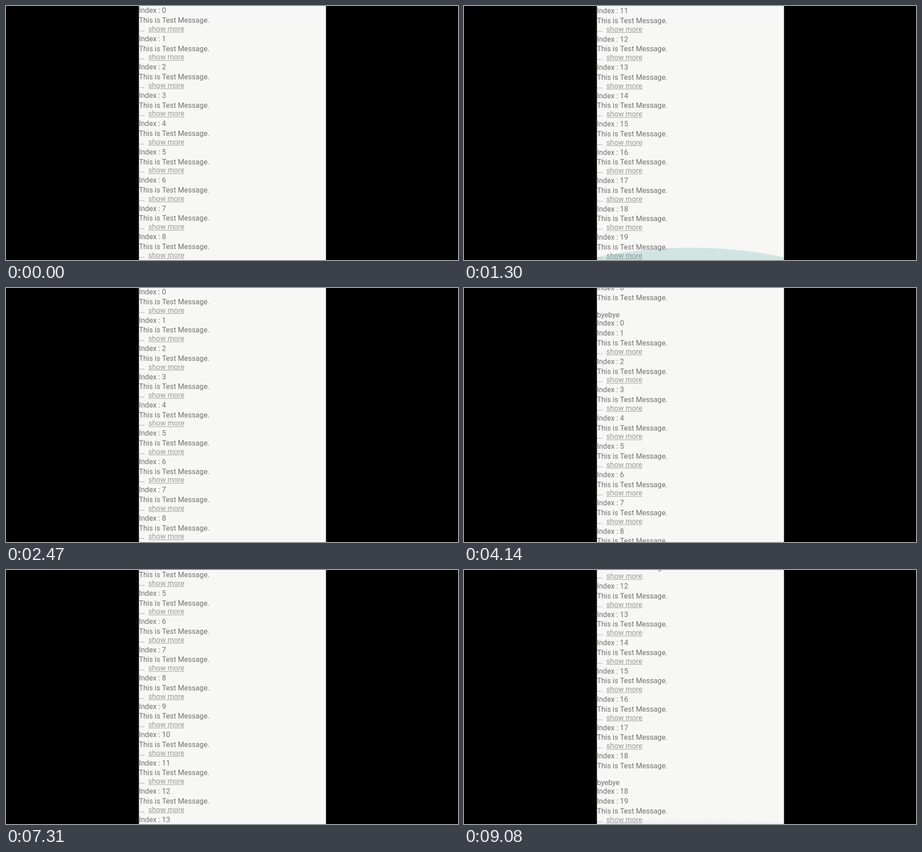
An HTML page with a canvas that plays this animation: 998 by 561 pixels, repeating every 9120 ms.

```html
<!DOCTYPE html>
<html lang="en">
<head>
<meta charset="utf-8">
<title>Expandable list</title>
<style>
html, body { margin: 0; width: 100%; height: 100%; overflow: hidden; background: #000; }
canvas { display: block; }
</style>
</head>
<body>
<canvas id="stage" width="998" height="561"></canvas>
<script>
const ctx = document.getElementById('stage').getContext('2d');
const W = 998, H = 561, LOOP = 9120;
const LEFT = 293.5, RIGHT = 706.5, MID = 500;
const COUNT = 20, ROW = 62.48, LINE = 18.78, EXTRA = 2 * LINE;
const BOTTOM = 686.5;
const TEXT_X = 293.6;
const FONT = '16.1px Roboto, "Noto Sans", sans-serif';

// Time at which a row shows its full text
const opened = { 0: 3550, 18: 6080 };

// Each fling ends at an edge of the list
const flings = [
  { start: 710, end: 1276, from: 0, to: BOTTOM },
  { start: 1882, end: 2472, from: BOTTOM, to: 0 },
  { start: 4097, end: 4662, from: 0, to: BOTTOM + EXTRA },
  { start: 6941, end: 7531, from: BOTTOM + EXTRA, to: 0 },
  { start: 8040, end: 8612, from: 0, to: BOTTOM + 2 * EXTRA }
];

// The finger speeds up, then the list runs at an even speed
function flingEase(u) {
  const a = 0.25;
  return (u < a ? u * u / (2 * a) : u - a / 2) / (1 - a / 2);
}

function scrollAt(t) {
  let y = 0;
  for (const f of flings) {
    if (t < f.start) break;
    const u = Math.min(1, (t - f.start) / (f.end - f.start));
    y = f.from + (f.to - f.from) * flingEase(u);
  }
  return y;
}

function drawRow(i, y, open) {
  const write = (text, base) => ctx.fillText(text, TEXT_X, y + base);
  const title = 'Index : ' + i;
  const body = 37.1;
  ctx.fillStyle = '#737373';
  write(title, 15.4);
  write('This is Test Message.', body);
  if (open) {
    write('byebye', body + 2 * LINE);
    write(title, body + 3 * LINE);
    return;
  }
  const base = body + LINE;
  const dots = '...  ';
  write(dots, base);
  const x = TEXT_X + ctx.measureText(dots).width;
  ctx.fillStyle = '#999';
  ctx.fillText('show more', x, y + base);
  ctx.fillRect(x, y + base + 1.4, ctx.measureText('show more').width, 1);
}

function drawList(t) {
  let y = -scrollAt(t);
  ctx.save();
  // An invisible slant keeps baselines from snapping to whole pixels
  ctx.transform(1, 1e-4, 0, 1, 0, -1e-4 * LEFT);
  for (let i = 0; i < COUNT; i++) {
    const open = t >= opened[i];
    const h = ROW + (open ? EXTRA : 0);
    if (y < H && y + h > 0) drawRow(i, y, open);
    y += h;
  }
  ctx.restore();
}

// Edge glow: quick rise on impact, then a slow retreat
function drawGlow(age, atTop) {
  const rise = 100, fall = 600;
  if (age <= 0 || age >= rise + fall) return;
  const slow = u => 1 - (1 - u) * (1 - u);
  let size, alpha;
  if (age < rise) {
    size = slow(age / rise);
    alpha = 0.12 + 0.08 * size;
  } else {
    size = 1 - slow((age - rise) / fall);
    alpha = 0.2 * size;
  }
  const r = 463.7, depth = 62.1;
  ctx.save();
  ctx.translate(MID, atTop ? 0 : H);
  ctx.scale(1, atTop ? size : -size);
  ctx.beginPath();
  ctx.arc(0, depth - r, r, 0, Math.PI * 2);
  ctx.fillStyle = `rgba(0, 133, 119, ${alpha})`;
  ctx.fill();
  ctx.restore();
}

function draw(t) {
  ctx.fillStyle = '#000';
  ctx.fillRect(0, 0, W, H);
  ctx.fillStyle = '#f7f7f5';
  ctx.fillRect(LEFT, 0, RIGHT - LEFT, H);
  ctx.save();
  ctx.beginPath();
  ctx.rect(LEFT, 0, RIGHT - LEFT, H);
  ctx.clip();
  ctx.font = FONT;
  ctx.textBaseline = 'alphabetic';
  drawList(t);
  for (const f of flings) drawGlow(t - f.end, f.to === 0);
  ctx.restore();
}

const begin = performance.now();
function tick() {
  draw((performance.now() - begin) % LOOP);
  requestAnimationFrame(tick);
}
tick();
</script>
</body>
</html>
```
